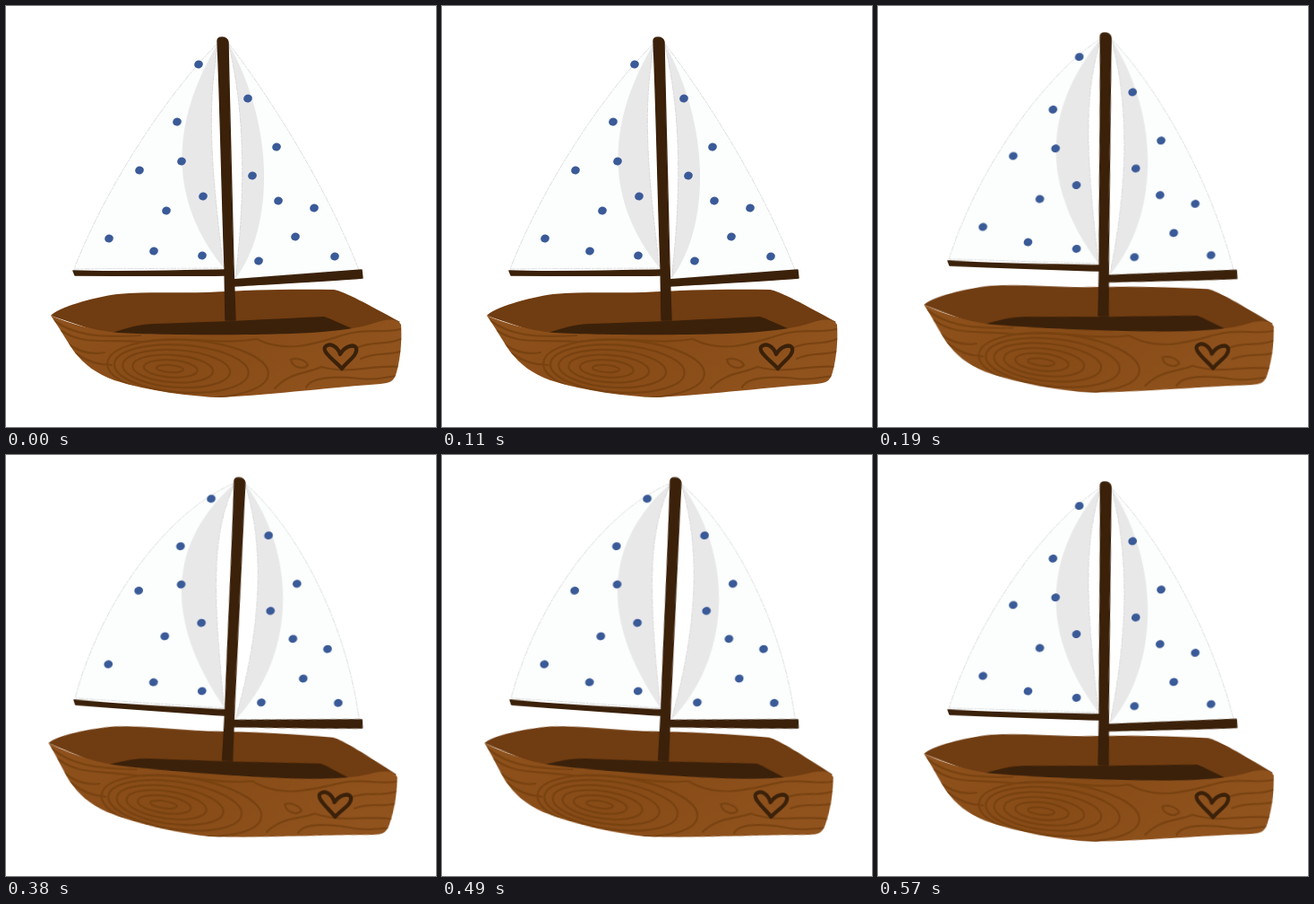
An HTML page for the animation above (760 ms loop, 480 by 469 pixels).

```html
<!DOCTYPE html>
<html lang="en">
<head>
<meta charset="utf-8">
<title>Sailboat</title>
<style>
  html, body { margin: 0; width: 100%; height: 100%; overflow: hidden; background: #fff; }
  svg { display: block; width: 100%; height: 100%; }
  .sail { fill: #fbfefd; }
  .gap { fill: #fff; }
  .edge { fill: none; stroke: #d0d0d2; stroke-width: .7; stroke-dasharray: 7 1 3 1; }
  .shade { fill: #e9e8e9; }
  .dot { fill: #3a5a98; }
  .dark { fill: #3b210a; stroke: #3b210a; stroke-width: 1.4; stroke-linejoin: round; }
  .heart { fill: none; stroke: #3b210a; stroke-width: 4.2; stroke-linejoin: round; }
  .grain { fill: none; stroke: #74400f; stroke-width: 2.2; stroke-linecap: round; opacity: .8; }
</style>
</head>
<body>
<svg id="stage" viewBox="0 0 480 469" xmlns="http://www.w3.org/2000/svg">
  <defs>
    <linearGradient id="wood" x1="0" y1="0" x2="1" y2=".25">
      <stop offset="0" stop-color="#8f521d"/>
      <stop offset=".5" stop-color="#874b17"/>
      <stop offset="1" stop-color="#90531e"/>
    </linearGradient>
    <path id="front" d="M50 345 C70 353 95 361 125 364 C180 367 290 367 340 364
      C370 362 395 359 412 353 C425 348 437 348 441 355 C442 370 441 390 436 408
      C433 419 428 420 418 421 C370 424 300 433 240 436 C205 435 160 429 121 417
      C100 409 88 400 76 385 C66 370 58 356 50 345Z"/>
    <clipPath id="clip"><use href="#front"/></clipPath>

    <g id="boat">
      <path fill="#703c11" d="M50 345 C58 336 95 325 124 321 C160 318 190 320 225 319
        C275 316 320 315 366 316 C378 318 405 333 440 352 L412 368 L125 370Z"/>
      <path fill="#3b210a" d="M118 364 C135 359 145 355 165 354 C230 352 295 349 355 346
        C364 349 374 354 388 360 L340 368 L125 367Z"/>
      <use href="#front" fill="url(#wood)"/>
      <g id="grain" class="grain" clip-path="url(#clip)">
        <path d="M53 350 C75 366 100 370 150 367"/>
        <path d="M62 362 C88 378 106 371 152 374 C205 367 240 378 280 371
          C315 389 350 374 382 365 C405 359 420 365 440 360"/>
        <path d="M300 426 C318 407 335 410 352 402 C385 411 410 399 440 402"/>
        <path d="M335 425 C340 413 370 412 394 415 C414 418 426 412 440 412"/>
        <path d="M318 394 C325 391 335 395 337 400 C333 405 320 404 318 394Z"/>
      </g>
      <path class="heart" d="M375 404 C367 395 353 386 356 380 C361 374 370 379 373 388
        C378 379 388 376 391 381 C393 389 382 395 375 404Z"/>
      <g class="dark">
        <path d="M75 295 C125 297 180 295 244 294 V300 C190 301 130 300 77 300Z"/>
        <path d="M253 305 C295 302 345 298 397 294 L398 303 C350 307 300 309 254 312Z"/>
        <path d="M236 39 Q236 35 241 35 Q247 35 248 40 C250 140 253 250 254 290
          L256 350 H245 L244 290 C241 210 239 100 236 39Z"/>
      </g>
    </g>
  </defs>
</svg>
<script>
const NS = 'http://www.w3.org/2000/svg';
const STEP = 190;
const WIND = [0, .5, 1, .5];
const stage = document.getElementById('stage');

// Sails at rest; push is how far full wind moves the middle of the cloth.
const sails = [
  {
    push: [-11, -15], top: [237, 41], foot: [76, 293], heel: [243, 292],
    outer: [[182, 95], [112, 200]], inner: [[226, 105], [226, 160]], shade: [[182, 132], [182, 217]],
    dots: [[215, 65], [191, 129], [196, 173], [149, 183], [220, 212], [179, 228], [115, 259], [165, 273], [219, 278]]
  },
  {
    push: [12, -9], top: [248, 41], foot: [394, 294], heel: [256, 304],
    outer: [[290, 95], [355, 195]], inner: [[269, 125], [266, 220]], shade: [[300, 133], [300, 245]],
    dots: [[270, 103], [302, 157], [275, 189], [304, 217], [344, 225], [323, 257], [367, 279], [282, 284]]
  }
];

function add(parent, tag, attrs) {
  const el = document.createElementNS(NS, tag);
  for (const k in attrs) el.setAttribute(k, attrs[k]);
  return parent.appendChild(el);
}

const shift = (p, push, k) => [p[0] + push[0] * k, p[1] + push[1] * k];

function drawSail(g, s, wind) {
  // Moving both controls by 4/3 moves the middle of the curve by 1.
  const curve = (ctrl, end, give) =>
    `M${s.top} C${ctrl.map(p => shift(p, s.push, wind * give * 4 / 3)).join(' ')} ${end}`;
  const outer = curve(s.outer, s.foot, 1);
  const inner = curve(s.inner, s.heel, .6);
  const shade = curve(s.shade, s.heel, 1);
  add(g, 'path', { class: 'sail', d: `${outer} L${s.heel}Z` });
  add(g, 'path', { class: 'shade', d: shade + 'Z' });
  add(g, 'path', { class: 'gap', d: inner + 'Z' });
  add(g, 'path', { class: 'edge', d: `${outer} L${s.heel} ${inner}` });
  for (const p of s.dots) {
    const [x, y] = shift(p, s.push, wind * Math.sin(Math.PI * (p[1] - 40) / 255));
    add(g, 'ellipse', { class: 'dot', cx: x, cy: y, rx: 4.9, ry: 4.4, transform: `rotate(-20 ${x} ${y})` });
  }
}

function drawPose(wind) {
  const dx = wind * (8 - 10.5 * wind);
  const g = add(stage, 'g', {
    transform: `translate(${dx} ${-24 * wind}) rotate(${4.1 * wind} 50 345)`
  });
  sails.forEach(s => drawSail(g, s, wind));
  add(g, 'use', { href: '#boat' });
  return g;
}

function drawGrain() {
  const grain = document.getElementById('grain');
  for (let i = 0; i < 6; i++) {
    const cx = 183 + .8 * i * i;
    add(grain, 'ellipse', { cx, cy: 404, rx: 15 + 15 * i, ry: 4 + 5.6 * i, transform: `rotate(4 ${cx} 404)` });
  }
  for (let i = 0; i < 2; i++) {
    add(grain, 'path', { d: `M${70 + 8 * i} ${377 + 10 * i} q18 13 40 ${9 + 4 * i}` });
    add(grain, 'path', { d: `M${391 + 5 * i} ${381 + 12 * i} c19 -9 30 -2 50 -10` });
  }
}

drawGrain();
const start = document.timeline.currentTime || 0;
for (const wind of new Set(WIND)) {
  const frames = [...WIND, WIND[0]].map((w, i) => ({
    opacity: w === wind ? 1 : 0, offset: i / WIND.length, easing: 'step-end'
  }));
  const anim = drawPose(wind).animate(frames, { duration: STEP * WIND.length, iterations: Infinity });
  anim.startTime = start;
}
</script>
</body>
</html>
```
